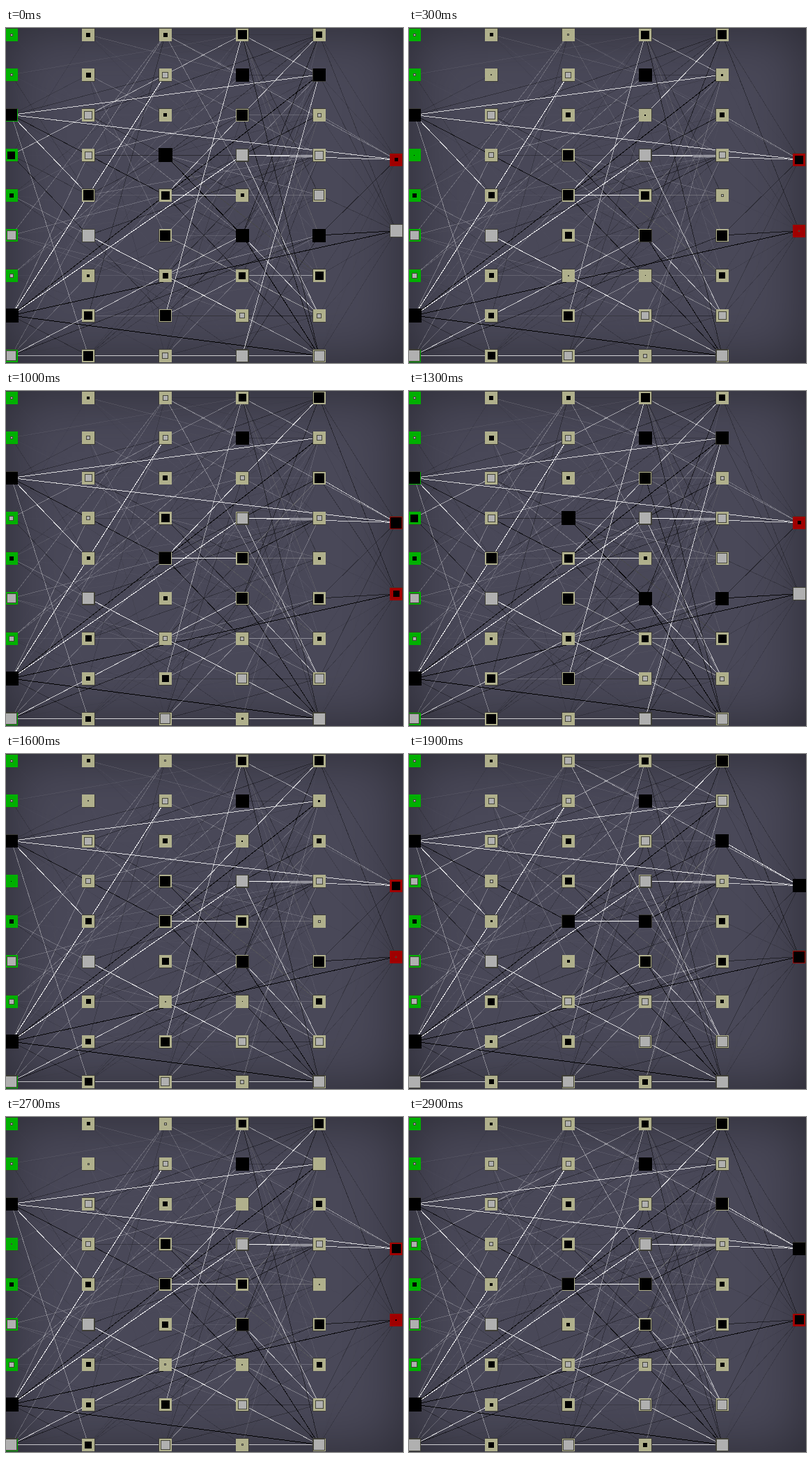
Animation, 570 px wide and 480 px high, one loop 3 s. Source, as an HTML page:

```html
<!DOCTYPE html>
<html lang="en">
<head>
<meta charset="utf-8">
<title>Neural network activity</title>
<style>
html, body { margin: 0; width: 100%; height: 100%; overflow: hidden; }
body { background: #494858; box-shadow: inset 0 0 80px rgba(0, 0, 0, .42); }
svg { display: block; shape-rendering: crispEdges; }
</style>
</head>
<body>
<svg id="stage" width="570" height="480"></svg>
<script>
const stage = document.getElementById('stage');
const LOOP = 3000, STEP = 100, FULL = 20;
const nodes = {}, links = [];

let seed = 11;
function random() {
  seed = (seed * 16807) % 2147483647;
  return seed / 2147483647;
}
const pick = n => Math.floor(random() * n);

function add(tag, attributes) {
  const element = document.createElementNS('http://www.w3.org/2000/svg', tag);
  set(element, attributes);
  return stage.appendChild(element);
}
function set(element, attributes) {
  for (const name in attributes) element.setAttribute(name, attributes[name]);
}
const box = (x, y, size) => ({ x: x - size / 2, y: y - size / 2, width: size, height: size });

// Node ids are column * 10 + row. Each node swings between two signed sizes
// of its inner square: light when positive, black when negative.
function addLayer(column, color, rest, peak) {
  rest.forEach((low, row) => {
    nodes[column * 10 + row] = {
      x: 7.7 + column * 110.5,
      y: column < 5 ? 9.5 + row * 57.5 : 188.5 + row * 102,
      color, low, high: peak[row]
    };
  });
}
addLayer(0, '#00b000', [3, 3, -17, -11, -6, 13, 5, -20, 14], [3, 3, -18, 10, -6, 13, 8, -20, 17]);
addLayer(1, '#b0b08c', [-6, -7, 11, 10, -15, 18, -4, -12, -14], [-4, 8, 10, 4, -3, 17, -10, -4, -7]);
addLayer(2, '#b0b08c', [-6, 8, -5, -20, -12, -15, -8, -16, 8], [10, 7, -8, -10, -18, -4, 10, -9, 16]);
addLayer(3, '#b0b08c', [-13, -19, -16, 17, -5, -19, -10, 7, 17], [-10, -19, 12, 16, -18, -15, 9, 15, -8]);
addLayer(4, '#b0b08c', [-9, -18, 5, 12, 14, -19, -12, 6, 15], [-16, 13, -19, 6, -9, -11, -5, 15, 17]);
addLayer(5, '#a00000', [-5, 18], [-19, -16]);

function connect(from, to, weight) {
  const a = nodes[from], b = nodes[to];
  const line = add('line', {
    x1: a.x, y1: a.y, x2: b.x, y2: b.y, stroke: weight > 0 ? '#fff' : '#000'
  });
  links.push({ line, source: a, weight });
}

// Random links: mostly weak, a few strong
for (let column = 0; column < 4; column++) {
  for (let i = 0; i < 63; i++) {
    const to = column + 1 + pick(4 - column);
    const sign = random() < .5 ? -1 : 1;
    connect(column * 10 + i % 9, to * 10 + pick(9), sign * random() ** 3);
  }
}
for (let row = 0; row < 9; row++) {
  connect(40 + row, 50, -.5 * random());
  connect(40 + row, 51, -.7 * random());
}

// Dominant links by source; a negative target inhibits
const dominant = {
  2: [14, 41, 50], 7: [21, 33, -51], 8: [35, 48], 15: [37], 20: [47, 50],
  24: [34, 40, -48], 27: [30], 30: [-48], 33: [43, 50], 42: [50], 45: [-51]
};
for (const from in dominant) {
  for (const to of dominant[from]) connect(from, Math.abs(to), Math.sign(to) * .9);
}

for (const node of Object.values(nodes)) {
  add('rect', { ...box(node.x, node.y, 19), fill: '#3c3b36' });
  add('rect', { ...box(node.x, node.y, 18), fill: node.color });
  node.core = add('rect', {});
}

// How far the network has swung from rest (0) to peak (1)
const swings = [[0, 0], [600, 1], [1000, .8], [1300, 0], [1900, 1], [2400, 0], [2900, .9]];
function swingAt(t) {
  const next = Math.max(1, swings.findIndex(([time]) => time >= t));
  const [t0, v0] = swings[next - 1], [t1, v1] = swings[next];
  const k = (t - t0) / (t1 - t0);
  return v0 + (v1 - v0) * k * k * (3 - 2 * k);
}

function draw(t) {
  const swing = swingAt(t);
  for (const node of Object.values(nodes)) {
    node.value = node.low + (node.high - node.low) * swing;
    const light = node.value > 0;
    set(node.core, {
      ...box(node.x, node.y, Math.round(Math.abs(node.value))),
      fill: light ? '#b0b0b0' : '#000',
      stroke: light ? '#45453a' : 'none'
    });
  }
  for (const { line, source, weight } of links) {
    set(line, { 'stroke-opacity': Math.abs(weight * source.value) / FULL });
  }
}

function tick() {
  draw(Math.floor(performance.now() % LOOP / STEP) * STEP);
  requestAnimationFrame(tick);
}
tick();
</script>
</body>
</html>
```
